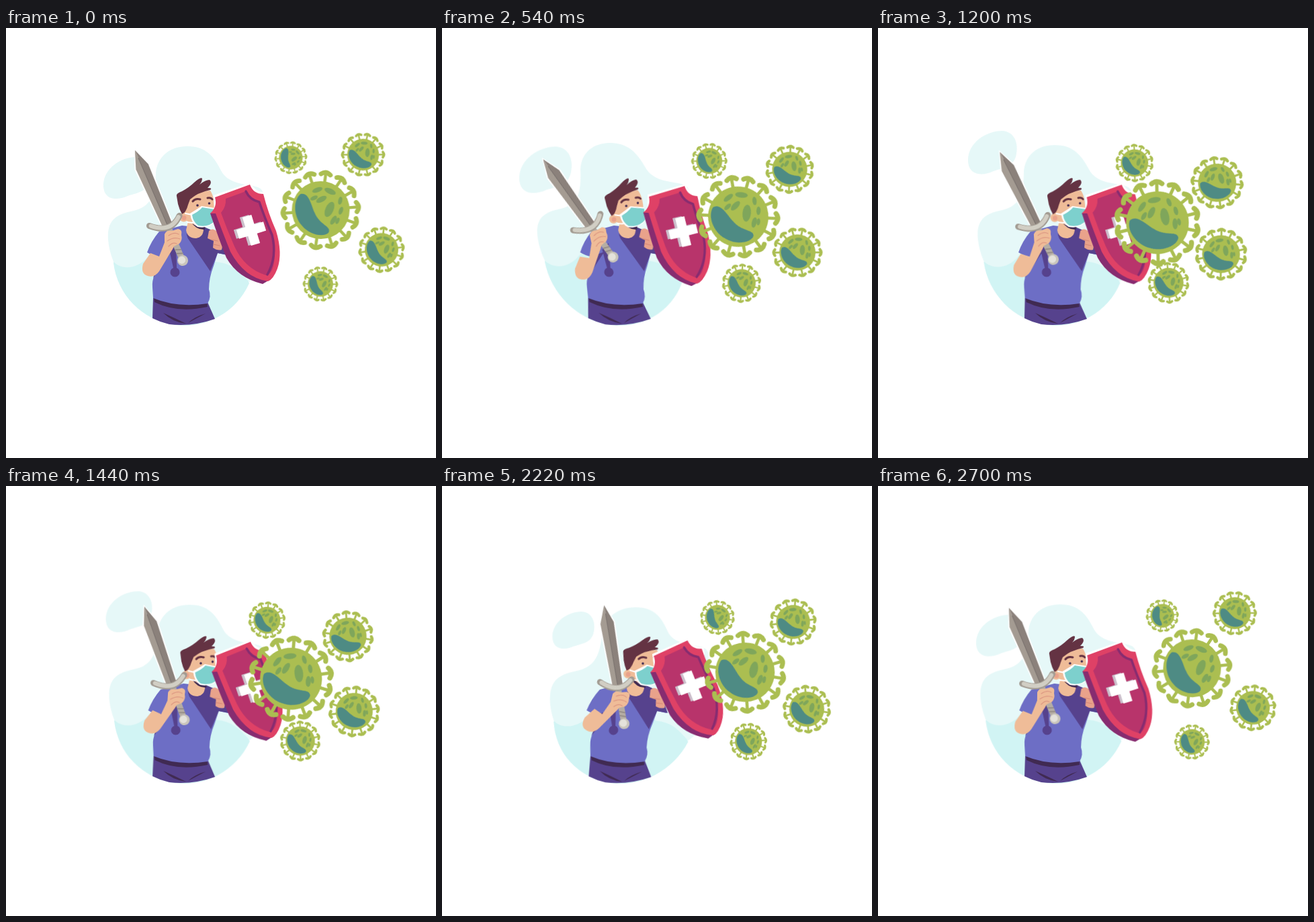
Recreate the animation shown at these times as an HTML page without scripts. Size 640 by 640 pixels, loop 2730 ms.

```html
<!DOCTYPE html>
<html lang="en">
<head>
<meta charset="utf-8">
<title>Shield against viruses</title>
<style>
  html, body { margin: 0; width: 100%; height: 100%; overflow: hidden; background: #fff; }
  svg { display: block; width: 100%; height: 100%; }

  .scene, .puff, .bob, .torso, .head, .arm, .shield, .germ {
    animation: 2730ms linear infinite;
  }

  /* The figure leans left, then right */
  .scene  { animation-name: scene;  transform-origin: 265px 443px; }
  .puff   { animation-name: puff;   transform-origin: 145px 193px; }
  .bob    { animation-name: bob; }
  .torso  { animation-name: torso;  transform-origin: 265px 440px; }
  .head   { animation-name: head;   transform-origin: 290px 393px; }
  .arm    { animation-name: arm;    transform-origin: 235px 383px; }
  .shield { animation-name: shield; transform-origin: 325px 201px; }

  @keyframes scene {
    0%, 100% { transform: skewX(0deg) scaleY(1); }
    27% { transform: skewX(5.7deg) scaleY(1.025); }
    73% { transform: skewX(-5.7deg) scaleY(.976); }
  }
  @keyframes puff {
    0%, 100% { transform: translate(0, 0) scale(1); }
    26.5% { transform: translate(-40px, 0) scale(1.15); }
    53% { transform: translate(4px, 0) scale(.98); }
    73% { transform: translate(28px, 0) scale(.84); }
  }
  @keyframes bob {
    0%, 100% { transform: translateY(0); }
    20% { transform: translateY(-14px); }
    40% { transform: translateY(-35px); }
    48% { transform: translateY(-40px); }
    59% { transform: translateY(-31px); }
    67% { transform: translateY(-20px); }
    81% { transform: translateY(-6px); }
  }
  @keyframes torso {
    0%, 100% { transform: skewX(0deg); }
    27% { transform: skewX(3.2deg); }
    73% { transform: skewX(-4.1deg); }
  }
  @keyframes head {
    0%, 100% { transform: rotate(0deg); }
    27% { transform: rotate(-6.5deg); }
    73% { transform: rotate(9deg); }
  }
  @keyframes arm {
    0%, 100% { transform: rotate(0deg); }
    27% { transform: rotate(-16.6deg); }
    73% { transform: rotate(20deg); }
  }
  @keyframes shield {
    0%, 100% { transform: rotate(0deg); }
    27% { transform: rotate(4.6deg); }
    73% { transform: rotate(-6.7deg); }
  }

  /* Each virus drifts from its home pose to its near pose and back */
  .germ { animation-name: drift; }
  .germ.late { animation-name: drift-late; }
  @keyframes drift {
    0%, 100% { transform: translate(var(--home)) rotate(var(--turn)) scale(var(--size)); }
    36.3% { transform: translate(var(--near)) rotate(var(--near-turn)) scale(var(--near-size)); }
  }
  @keyframes drift-late {
    0%, 100% { transform: translate(var(--home)) rotate(var(--turn)) scale(var(--size)); }
    40.3% { transform: translate(var(--near)) rotate(var(--near-turn)) scale(var(--near-size)); }
  }

  .line { fill: none; stroke-linecap: round; stroke-linejoin: round; }
  .shirt { fill: #6d6ec5; }
  .shade { fill: #56428d; }
  .dark { fill: #402a52; }
  .skin { fill: #efbc98; }
  .blush { fill: #e9a28b; }
  .hair { fill: #643343; }
</style>
</head>
<body>
<svg viewBox="0 0 640 640">
  <defs>
    <g id="spike" class="line" stroke="#abbe51">
      <path d="M0-40V-56" stroke-width="4.5"/>
      <path d="M-7-53.500Q0-59.500 7-53.500" stroke-width="6.800"/>
    </g>
    <g id="spikes">
      <use href="#spike"/>
      <use href="#spike" transform="rotate(25.714)"/>
    </g>
    <g id="virus">
      <g transform="rotate(8)">
        <use href="#spikes"/>
        <use href="#spikes" transform="rotate(51.429)"/>
        <use href="#spikes" transform="rotate(102.857)"/>
        <use href="#spikes" transform="rotate(154.286)"/>
        <use href="#spikes" transform="rotate(205.714)"/>
        <use href="#spikes" transform="rotate(257.143)"/>
        <use href="#spikes" transform="rotate(308.571)"/>
      </g>
      <circle r="43" fill="#abbe51"/>
      <g fill="#7fa65b">
        <ellipse rx="8" ry="3.5" transform="translate(-5 -30)rotate(-20)"/>
        <ellipse rx="9" ry="4" transform="translate(14 -28)rotate(24)"/>
        <ellipse rx="3" ry="6" transform="translate(29 -14)rotate(12)"/>
        <ellipse rx="6" ry="3" transform="translate(-10 -18)rotate(-25)"/>
        <ellipse rx="8.5" ry="4" transform="translate(1 -16)rotate(-28)"/>
        <ellipse rx="6" ry="12" transform="translate(13 -1)rotate(24)"/>
        <ellipse rx="3" ry="6" transform="translate(30 1)rotate(20)"/>
        <ellipse rx="3.5" ry="7.5" transform="translate(19 15)rotate(32)"/>
        <ellipse rx="2.5" ry="5" transform="translate(25 16)rotate(24)"/>
      </g>
      <path fill="#4e8b84" d="M-30-24C-42-14-40 10-28 23C-16 38 6 41 12 33C16 24-2 22-9 4C-14-6-17-27-30-24Z"/>
    </g>
    <path id="cross" d="M-7-22H7V-7H21V7H7V22H-7V7H-21V-7H-7Z"/>
  </defs>

  <g class="puff"><g class="bob">
    <path fill="#e6f8f8" d="M145 234C145 209 171 192 194 192C211 193 218 209 214 227C210 244 196 245 181 250C166 257 145 257 145 234Z"/>
  </g></g>

  <g class="scene">
    <path fill="#d1f4f4" d="M160 350L165 325H340L362 380A106 106 0 0 1 160 350Z"/>
    <path fill="#e6f8f8" d="M152 315C150 285 165 277 190 272C215 266 222 250 223 215C226 190 245 176 270 176C298 176 310 192 320 212C330 232 355 232 372 236C384 239 384 248 384 260C384 300 400 350 362 378C345 360 335 350 312 348C290 320 240 320 212 340C195 360 172 360 160 348Q153 330 152 315Z"/>
  </g>

  <g class="torso">
    <path class="shade" d="M219 400L218 432Q230 438 243 441Q277 445 311 433L300 408Z"/>
    <path class="dark" d="M220 401Q258 417 299 408L300 415Q255 425 221 408Z"/>
    <path class="dark" d="M234 424Q248 438 268 440Q252 432 234 424ZM271 439Q280 430 297 425Q282 433 271 439Z"/>
    <path class="shirt" d="M262 294L228 303Q216 317 210 334Q218 339 228 341L235 345Q216 368 218 386L219 402Q255 417 300 410Q306 400 302 389Q302 372 309 354L315 335L329 338L318 306L297 298Z"/>
    <path class="shade" d="M270 296Q266 309 274 318L304 362L315 335L331 338L318 306L297 297Z"/>
    <path class="shade" d="M243 330L249 357A7 7 0 1 0 254 357L253 320ZM230 339L219 372L246 333Z"/>
    <path class="skin" d="M271 288L268 301Q270 313 283 313Q294 311 294 299V286Z"/>
    <path class="dark" d="M275 288Q283 301 296 300L297 292Z"/>
  </g>

  <g class="head">
    <path class="skin" d="M260 266L271 250Q287 242 304 242Q311 252 310 274L304 290Q290 299 277 291L267 286Z"/>
    <circle class="skin" cx="264.500" cy="282" r="6.500"/>
    <circle class="blush" cx="265" cy="282.500" r="3.500"/>
    <path class="hair" d="M254 250Q253 246 262 243Q273 237 280 230Q290 221 292 224Q292 229 288 233Q297 226 303 226Q308 230 300 238Q308 238 304 241Q285 245 274 255L271 263Q268 275 262 277Q258 270 256 262Z"/>
    <path class="line" stroke="#643343" stroke-width="3" d="M278 258Q282 253 289 255M300 253Q305 252 307 255"/>
    <circle class="dark" cx="285" cy="264" r="1.800"/>
    <circle class="dark" cx="302.500" cy="261" r="1.800"/>
    <path class="line" stroke="#fff" stroke-width="2" d="M267 276L277 278M270 289L278 290"/>
    <path fill="#fff" d="M274 276Q284 270 291 265L311 268V288Q302 299 285 296Q276 291 274 276Z"/>
    <path fill="#7dd0cd" d="M277 278Q287 273 292 267L311 270V287Q302 297 286 294Q278 288 277 278Z"/>
  </g>

  <g class="arm">
    <path class="skin" d="M215 335L204 351Q200 366 211 369Q221 372 228 362L248 329L238 314L228 340Z"/>
    <g transform="translate(263 346)rotate(-23.4)">
      <path fill="#fff" d="M0-182L-12-152L-9-54H9L12-152Z"/>
      <path fill="#a49b92" d="M0-179L-10-152L-7.500-55H0Z"/>
      <path fill="#8b817b" d="M0-179L10-152L7.500-55H0Z"/>
      <path class="line" stroke="#756d69" d="M0-166V-58"/>
      <path fill="#b5ada4" d="M-4.500-54H4.500V-4H-4.500Z"/>
      <path class="line" stroke="#8f8781" stroke-width="1.500" d="M-4-19L4-16M-4-13L4-10"/>
      <path class="line" stroke="#a29b92" stroke-width="9" stroke-linecap="butt" d="M-25-67Q0-43 22-63"/>
      <path class="line" stroke="#d1cec4" stroke-width="6" d="M-23-66Q0-45 20-62"/>
      <circle r="8" fill="#c9c5bb"/>
      <circle cx="-1" cy="-1" r="5.500" fill="#e4e2db"/>
    </g>
    <path class="skin" d="M236 307Q238 301 247 302L256 299Q263 300 261 308Q263 316 258 321L250 325Q247 333 241 332Q235 330 236 320Z"/>
    <path class="line" stroke="#dc9782" stroke-width="1.200" d="M242 309Q251 303 257 307M240 317Q250 310 259 314M242 325Q248 318 254 321"/>
  </g>

  <g class="shield">
    <path class="blush" d="M302 302Q307 297 313 302L323 320L321 330Q315 332 308 327L309 317L300 313Z"/>
    <path class="line" stroke="#d58676" d="M306 315L315 317M309 322L318 324"/>
    <path fill="#fff" d="M309 249L364 230Q370 244 386 245L387 256L310 275Z"/>
    <path fill="#872c70" d="M304 276L314 270L335 330Q355 370 392 375L382 381Q345 372 328 342Q316 312 304 276Z"/>
    <path fill="#df4166" d="M311 252L363 233Q368 247 383 247Q390 275 402 302Q412 335 404 358Q398 374 390 377Q355 372 334 333Q322 303 312 276L304 276Q315 266 311 252Z"/>
    <path fill="#b8346b" d="M327 254L357 243Q363 256 377 259Q384 280 396 308Q404 340 396 360Q392 368 387 368Q355 358 340 325Q329 300 320 275Q328 266 327 254Z"/>
    <path class="line" stroke="#872c70" stroke-width="3.500" d="M357 243Q363 256 377 259Q384 280 396 308Q404 340 389 367"/>
    <use href="#cross" fill="#cbbfcb" transform="translate(361 301)rotate(-17)"/>
    <use href="#cross" fill="#fff" transform="translate(365 301)rotate(-17)"/>
  </g>

  <use href="#virus" class="germ" style="--home:424px,193px;--turn:26deg;--size:.41;--near:376px,202px;--near-turn:-14deg;--near-size:.485"/>
  <use href="#virus" class="germ late" style="--home:531.5px,188.5px;--turn:-21deg;--size:.55;--near:503px,233px;--near-turn:-43deg;--near-size:.67"/>
  <use href="#virus" class="germ" style="--home:559px,330px;--turn:-2deg;--size:.58;--near:504px,337.5px;--near-turn:-37deg;--near-size:.665"/>
  <use href="#virus" class="germ" style="--home:468px,381px;--turn:6deg;--size:.44;--near:427.5px,379px;--near-turn:-14deg;--near-size:.53"/>
  <use href="#virus" class="germ late" style="--home:468.5px,271px;--turn:0deg;--size:1;--near:412.5px,291px;--near-turn:-37deg;--near-size:1.09"/>
</svg>
</body>
</html>
```
